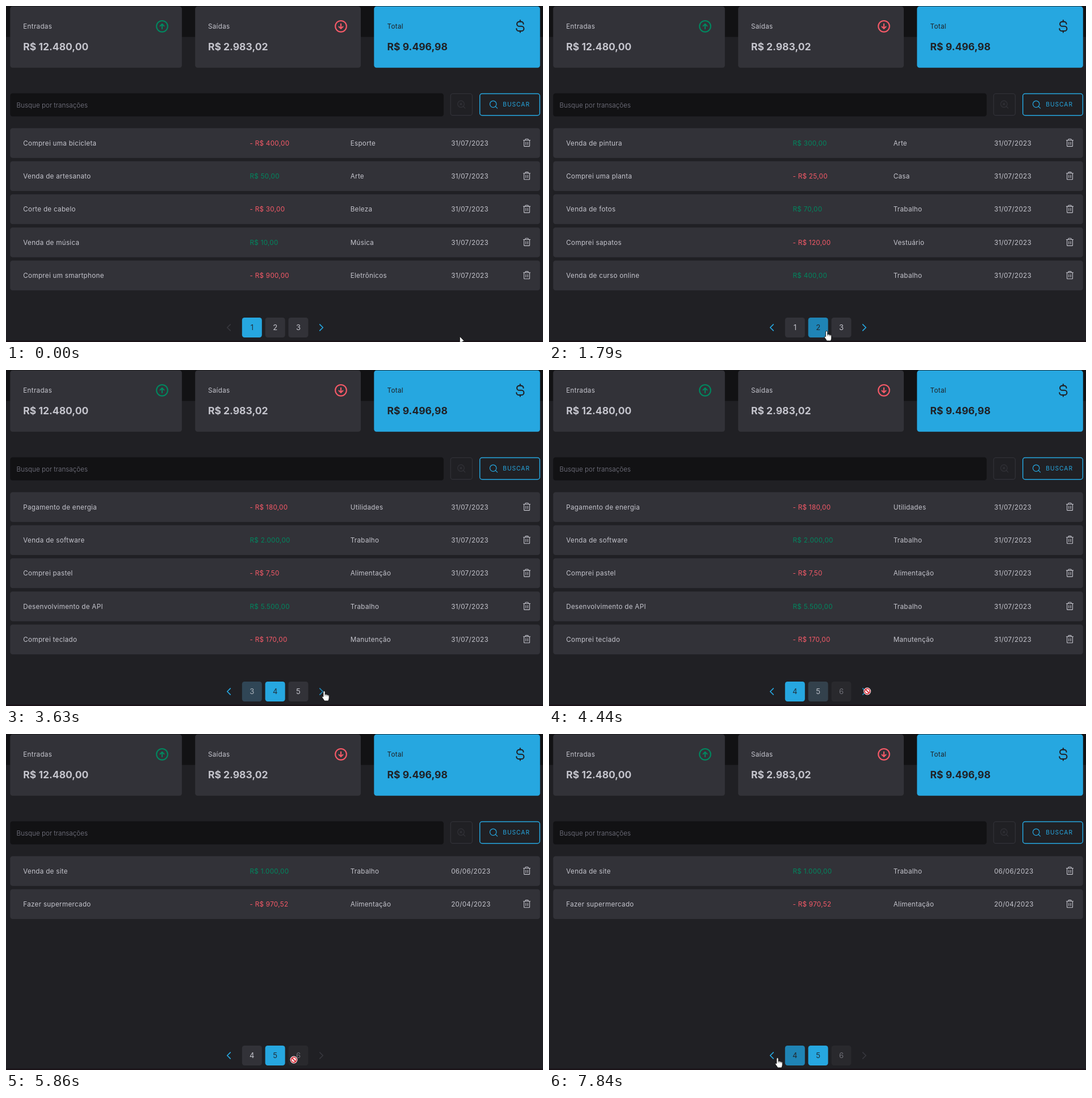
Animation, 946 px wide and 592 px high, one loop 8000 ms. Source, as an HTML page:

```html
<!DOCTYPE html>
<html lang="pt-BR">
<head>
<meta charset="utf-8">
<title>Transações</title>
<style>
  html, body { margin: 0; width: 100%; height: 100%; overflow: hidden; background: #202024; }
  svg { display: block; }
  text {
    font: 400 11.67px Inter, sans-serif;
    font-optical-sizing: none;
    letter-spacing: .025em;
    fill: #c4c4cc;
    white-space: pre;
  }
  .value { font-size: 17.5px; font-weight: 700; letter-spacing: 0; }
  .ink { fill: #202024; }
  .hint { fill: #7c7c8a; font-weight: 300; letter-spacing: 0; }
  .action { fill: #26a7e0; font-size: 10.21px; letter-spacing: .1em; }
  .in { fill: #00875f; }
  .out { fill: #f75a68; }
  .tab { font-size: 13.1px; letter-spacing: 0; text-anchor: middle; }
  .icon { fill: none; stroke-linecap: round; stroke-linejoin: round; }
</style>
</head>
<body>
<svg id="stage" width="946" height="592" viewBox="0 0 946 592">
  <defs>
    <g id="trash" class="icon" stroke="#c4c4cc" stroke-width="16">
      <path d="M216 56H40M104 104V168M152 104V168M200 56V208a8 8 0 0 1-8 8H64a8 8 0 0 1-8-8V56M168 56V40a16 16 0 0 0-16-16H104A16 16 0 0 0 88 40V56"/>
    </g>
    <g id="lens" class="icon" stroke-width="18">
      <circle cx="116" cy="116" r="84"/><path d="M175 175L224 224"/>
    </g>
    <g id="arrow" class="icon" stroke-width="20">
      <circle cx="128" cy="128" r="96"/><path d="M94 122L128 88L162 122M128 88V170"/>
    </g>
    <path id="dollar" class="icon" stroke="#202024" stroke-width="20"
      d="M128 24V48M128 208V232M184 88a40 40 0 0 0-40-40H112a40 40 0 0 0 0 80h40a40 40 0 0 1 0 80H104a40 40 0 0 1-40-40"/>
    <path id="caret" class="icon" stroke-width="25" d="M160 208L80 128L160 48"/>
  </defs>

  <rect width="946" height="54.5" fill="#121214"/>
  <rect y="589.5" width="946" height="2.5" fill="#1a1318"/>
  <g fill="#323238">
    <rect x="7.3" y=".7" width="302.6" height="108" rx="4.4"/>
    <rect x="333.2" y=".7" width="291.8" height="108" rx="4.4"/>
    <rect x="648.3" y=".7" width="292.5" height="108" rx="4.4" fill="#26a7e0"/>
  </g>
  <text x="30.3" y="40.2">Entradas</text>
  <text x="356" y="40.2">Saídas</text>
  <text x="671.6" y="40.2" class="ink">Total</text>
  <text x="30.3" y="78.4" class="value">R$ 12.480,00</text>
  <text x="356" y="78.4" class="value">R$ 2.983,02</text>
  <text x="671.6" y="78.4" class="value ink">R$ 9.496,98</text>
  <use href="#arrow" stroke="#00875f" transform="translate(275 35.8) scale(.1025) translate(-128 -128)"/>
  <use href="#arrow" stroke="#f75a68" transform="translate(590 35.8) scale(.1025 -.1025) translate(-128 -128)"/>
  <use href="#dollar" transform="translate(905.8 35.8) scale(.1025) translate(-128 -128)"/>

  <rect x="7.3" y="153.8" width="763.7" height="40.8" rx="4.4" fill="#121214"/>
  <text x="18.6" y="178.6" class="hint">Busque por transações</text>
  <g stroke="#323238">
    <rect x="783.2" y="154.5" width="38.2" height="38.2" rx="4" fill="none" stroke-width="1.2"/>
    <g transform="translate(802.3 173.5) scale(.0684) translate(-128 -128)">
      <use href="#lens"/><path class="icon" stroke-width="18" d="M90 90L142 142M142 90L90 142"/>
    </g>
  </g>
  <rect x="834.7" y="154.5" width="105.6" height="38.2" rx="4" fill="none" stroke="#26a7e0" stroke-width="1.46"/>
  <use href="#lens" stroke="#26a7e0" transform="translate(859 173.6) scale(.0684) translate(-128 -128)"/>
  <text x="875.2" y="177.3" class="action">BUSCAR</text>

  <g id="pages"></g>
  <g id="tabs"></g>
  <use id="prev" href="#caret" transform="translate(393 566.5) scale(.0684) translate(-128 -128)"/>
  <use id="next" href="#caret" transform="translate(555 566.5) scale(-.0684 .0684) translate(-128 -128)"/>

  <g id="cursor">
    <path id="point" fill="#fff" stroke="#111" stroke-width=".9" stroke-linejoin="round"
      d="M0 0V12.2L2.9 9.6L4.9 14.2L6.9 13.3L4.9 8.8H8.6Z"/>
    <g id="hand" stroke="#111" stroke-width=".9" stroke-linejoin="round">
      <path fill="#fff" d="M-1.6 1.2a1.6 1.6 0 0 1 3.2 0V6l.3-.2a1.4 1.4 0 0 1 2.5.5a1.4 1.4 0 0 1 2.3.6a1.3 1.3 0 0 1 2 1.1V12c0 2-.9 3-1.4 5H.2C-.3 15-2 13.5-3.6 11c-.9-1.5.7-2.8 2-1.3z"/>
      <path fill="none" stroke-width=".6" d="M1.6 6V8.6M4.3 6.6V8.8M6.7 7.2V9"/>
    </g>
    <g id="deny" fill="none">
      <circle r="5" fill="#fff" stroke="#fff" stroke-width="2.8"/>
      <circle r="4.6" stroke="#d3202c" stroke-width="1.7"/>
      <path d="M-3.2 -3.2L3.2 3.2" stroke="#d3202c" stroke-width="1.8"/>
    </g>
  </g>
</svg>
<script>
const $ = id => document.getElementById(id);

// description | signed amount | category | date
const lists = [
  ["Comprei uma bicicleta|-400,00|Esporte", "Venda de artesanato|50,00|Arte", "Corte de cabelo|-30,00|Beleza",
   "Venda de música|10,00|Música", "Comprei um smartphone|-900,00|Eletrônicos"],
  ["Venda de pintura|300,00|Arte", "Comprei uma planta|-25,00|Casa", "Venda de fotos|70,00|Trabalho",
   "Comprei sapatos|-120,00|Vestuário", "Venda de curso online|400,00|Trabalho"],
  ["Concerto de violão|-60,00|Manutenção", "Venda de e-book|150,00|Trabalho",
   "Assinatura de serviço online|-20,00|Entretenimento", "Jantar em restaurante|-100,00|Alimentação",
   "Consultoria|3.000,00|Trabalho"],
  ["Pagamento de energia|-180,00|Utilidades", "Venda de software|2.000,00|Trabalho",
   "Comprei pastel|-7,50|Alimentação", "Desenvolvimento de API|5.500,00|Trabalho",
   "Comprei teclado|-170,00|Manutenção"],
  ["Venda de site|1.000,00|Trabalho|06/06/2023", "Fazer supermercado|-970,52|Alimentação|20/04/2023"]
];

// button look: fill, text
const looks = {
  idle: ["#323238", "#c4c4cc"],
  active: ["#26a7e0", "#20303c"],
  hover: ["#1f84b5", "#20282f"],
  off: ["#29292d", "#707078"],
  half: ["#305469", "#99a2aa"],
  late: ["#304656", "#aab2ba"],
  rise: ["#24698d", "#5c3c40"],
  early: ["#33414c", "#b8bcc4"]
};
const carets = { on: "#26a7e0", dim: "#2189b9", off: "#37373d" };

// time, changes; anything left out carries over
const steps = [
  [0, { page: 0, cursor: "point 799.3 582", tabs: "active 1 idle 2 idle 3", prev: "off", next: "on" }],
  [180, { cursor: "point 758 582" }],
  [380, { cursor: "point 672 580" }],
  [580, { cursor: "point 575 577" }],
  [790, { cursor: "hand 484 574", tabs: "active 1 rise 2 idle 3" }],
  [990, { cursor: "hand 472.5 574", tabs: "active 1 hover 2 idle 3" }],
  [1190, { page: 1, tabs: "half 1 hover 2 idle 3", prev: "dim", next: "dim" }],
  [1390, { tabs: "idle 1 hover 2 idle 3", prev: "on", next: "on" }],
  [1590, { cursor: "hand 477 574" }],
  [1790, { cursor: "hand 489 573" }],
  [2000, { cursor: "hand 505 571", tabs: "idle 1 active 2 rise 3" }],
  [2200, { cursor: "hand 513 570", tabs: "idle 1 active 2 hover 3" }],
  [2410, { page: 2, tabs: "late 2 active 3 rise 4" }],
  [2600, { tabs: "idle 2 active 3 hover 4" }],
  [2800, { cursor: "point 543 568", tabs: "idle 2 active 3 idle 4" }],
  [3000, { cursor: "hand 560.5 566", next: "dim" }],
  [3420, { tabs: "active 3 early 4 idle 5" }],
  [3620, { page: 3, tabs: "late 3 active 4 idle 5" }],
  [3830, { tabs: "idle 3 active 4 idle 5" }],
  [4240, { next: "on" }],
  [4440, { cursor: "deny 560.7 566", tabs: "active 4 early 5 off 6", next: "dim" }],
  [4650, { page: 4, tabs: "idle 4 active 5 off 6", next: "off" }],
  [5040, { cursor: "deny 558 569" }],
  [5240, { cursor: "point 549 573" }],
  [5450, { cursor: "point 538 574" }],
  [5650, { cursor: "deny 522 574" }],
  [5850, { cursor: "deny 507 574" }],
  [6050, { cursor: "point 494 574" }],
  [6260, { cursor: "hand 477 573", tabs: "idle 4 hover 5 off 6" }],
  [6460, { cursor: "hand 452 572", tabs: "rise 4 active 5 off 6" }],
  [6660, { cursor: "hand 439.5 571", tabs: "hover 4 active 5 off 6" }],
  [7250, { cursor: "hand 460 571", tabs: "idle 4 hover 5 off 6" }],
  [7450, { cursor: "hand 446 571", tabs: "hover 4 active 5 off 6" }],
  [7650, { cursor: "hand 424 571" }],
  [7840, { cursor: "hand 402.5 571" }]
];
const loop = 8000;

let last = {};
const states = steps.map(([time, change]) => (last = { ...last, ...change, time }));

function add(parent, tag, attrs, label) {
  const el = document.createElementNS("http://www.w3.org/2000/svg", tag);
  for (const key in attrs) el.setAttribute(key, attrs[key]);
  if (label) el.textContent = label;
  return parent.appendChild(el);
}

function drawRow(group, row, i) {
  const [name, amount, kind, date = "31/07/2023"] = row.split("|");
  const spent = amount[0] === "-";
  const mid = 241.4 + i * 58.33;
  const y = mid + 4.25;
  add(group, "rect", { x: 7.3, y: mid - 26.25, width: 933.5, height: 52.5, rx: 4.4, fill: "#323238" });
  add(group, "text", { x: 30.3, y }, name);
  add(group, "text", { x: 429.5, y, class: spent ? "out" : "in" }, spent ? "- R$ " + amount.slice(1) : "R$ " + amount);
  add(group, "text", { x: 606.7, y }, kind);
  add(group, "text", { x: 784.2, y }, date);
  add(group, "use", { href: "#trash", transform: `translate(917.5 ${mid}) scale(.0684) translate(-128 -128)` });
}

const pages = lists.map(list => {
  const group = add($("pages"), "g", {});
  list.forEach((row, i) => drawRow(group, row, i));
  return group;
});

const tabs = [0, 1, 2].map(i => {
  const x = 415.8 + i * 40.83;
  return {
    box: add($("tabs"), "rect", { x, y: 549, width: 35, height: 35, rx: 4.4 }),
    label: add($("tabs"), "text", { x: x + 17.5, y: 571.2, class: "tab" })
  };
});

function show(state) {
  pages.forEach((page, i) => page.style.display = i === state.page ? "" : "none");
  const parts = state.tabs.split(" ");
  tabs.forEach(({ box, label }, i) => {
    const [fill, ink] = looks[parts[2 * i]];
    box.style.fill = fill;
    label.style.fill = ink;
    label.textContent = parts[2 * i + 1];
  });
  $("prev").style.stroke = carets[state.prev];
  $("next").style.stroke = carets[state.next];
  const [shape, x, y] = state.cursor.split(" ");
  for (const id of ["point", "hand", "deny"]) $(id).style.display = id === shape ? "" : "none";
  $("cursor").setAttribute("transform", `translate(${x} ${y})`);
}

let shown;
const start = performance.now();
function tick() {
  const time = Math.max(0, performance.now() - start) % loop;
  const state = states.filter(s => s.time <= time).pop();
  if (state !== shown) show(shown = state);
  requestAnimationFrame(tick);
}
tick();
</script>
</body>
</html>
```
